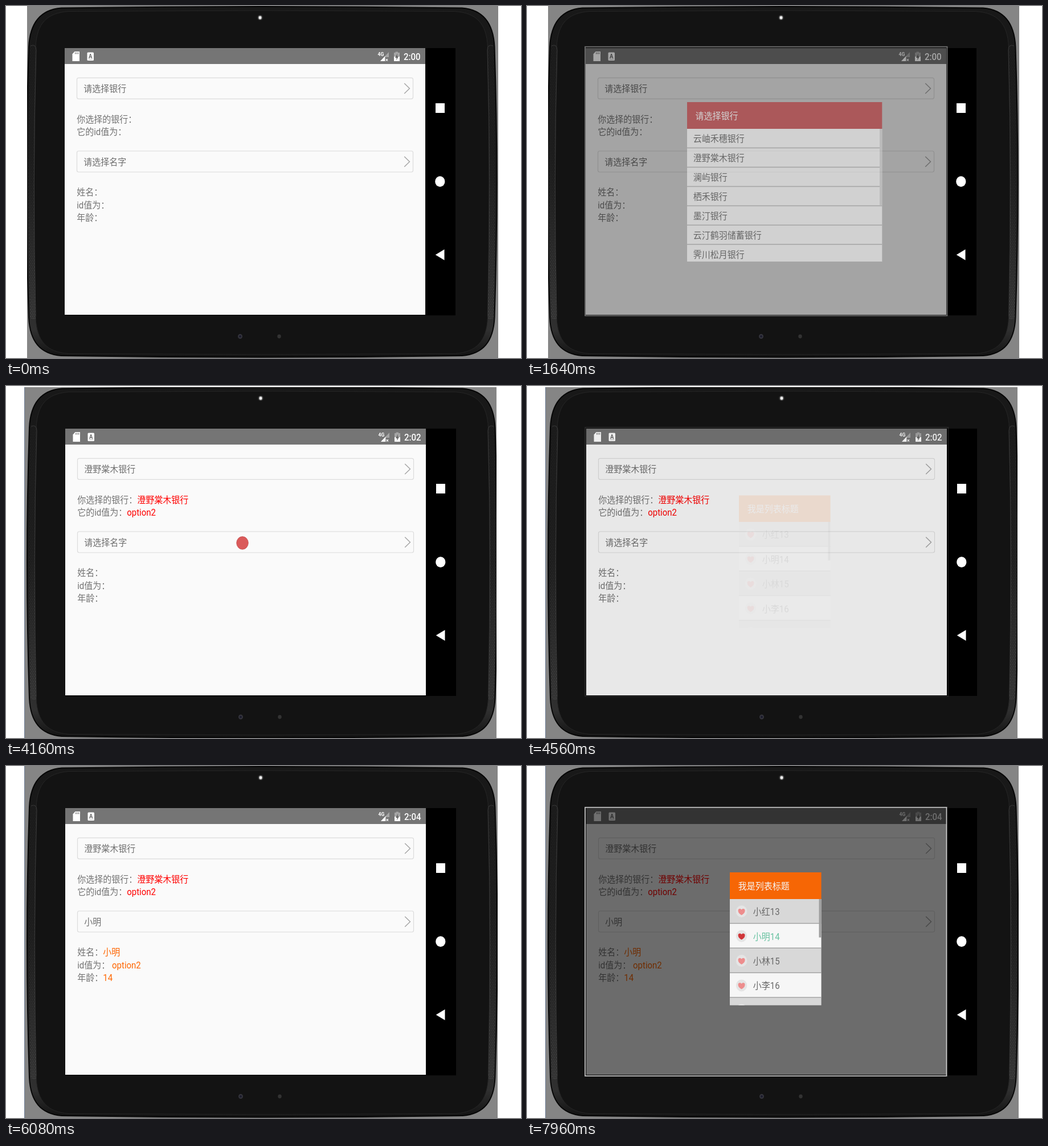
Write an HTML page with a canvas that moves like this. It is 904x619 px and loops after 8000 ms.

```html
<!DOCTYPE html>
<html lang="zh-CN">
<head>
<meta charset="utf-8">
<title>选择列表</title>
<style>
html, body { margin: 0; width: 100%; height: 100%; overflow: hidden; background: #fff; }
canvas { display: block; }
</style>
</head>
<body>
<canvas id="stage" width="904" height="619"></canvas>
<script>
const W = 904, H = 619, LOOP = 8000, STEP = 40;
const ASPECT = 1.09; // the tablet is shown slightly taller than it is
const FONT = 'Roboto, "Noto Sans CJK SC", "Noto Sans CJK", sans-serif';
const BANKS = ['云岫禾穗银行', '澄野棠木银行', '澜屿银行', '栖禾银行', '墨汀银行', '云汀鹤羽储蓄银行', '霁川松月银行'];
const PEOPLE = ['小红13', '小明14', '小林15', '小李16', '小王17'];
const RED = '#ff0000', ORANGE = '#ff6600', GREY = '#747474';

const SLIDES = [
  { crop: [37, 0, 864], dx: 0, dy: 0, time: '2:00', dim: 0.69, frame: [102, 71.7, 737.5, 544.5] },
  { crop: [32, 2, 861], dx: 1, dy: 1, time: '2:02', dim: 0.65, frame: [102, 72.8, 739.5, 545.5], bank: BANKS[1] },
  { crop: [32, 0, 863], dx: 1, dy: 0, time: '2:04', dim: 0.595, frame: [102, 72.8, 736.5, 545], bank: BANKS[1], person: '小明' }
];
const FADES = [[3200, 3600], [5680, 6080]];
const DIALOGS = [1280, 4480, 7280];
const DIALOG_TIME = 720;
const DOTS = [
  { start: 530, end: 1180, from: [350, 125], to: [293, 144.5] },
  { start: 2290, end: 3150, from: [514, 243], to: [445, 266.5] },
  { start: 3600, end: 4480, from: [517, 243], to: [415, 276] },
  { start: 5240, end: 5720, from: [520, 280], to: [450, 304] },
  { start: 6410, end: 7290, from: [575, 242], to: [473, 275.5] }
];

const clamp = v => Math.max(0, Math.min(1, v));

function layer(draw) {
  const c = document.createElement('canvas');
  c.width = W;
  c.height = H;
  draw(c.getContext('2d'));
  return c;
}

function box(g, x0, y0, x1, y1, color) {
  g.fillStyle = color;
  g.fillRect(x0, y0, x1 - x0, y1 - y0);
}

function poly(g, color, ...p) {
  g.fillStyle = color;
  g.beginPath();
  for (let i = 0; i < p.length; i += 2) g.lineTo(p[i], p[i + 1]);
  g.fill();
}

function oval(g, x, y, rx, ry, color) {
  g.fillStyle = color;
  g.beginPath();
  g.ellipse(x, y, rx, ry, 0, 0, 7);
  g.fill();
}

// y is the middle of the line
function text(g, str, x, y, color, size = 15, weight = 400) {
  g.save();
  g.translate(x, y + size * 0.38 * ASPECT);
  g.scale(1, ASPECT);
  g.font = `${weight} ${size}px ${FONT}`;
  g.fillStyle = color;
  g.fillText(str, 0, 0);
  g.restore();
}

function shell(g, inset, bulge) {
  const l = 40 + inset, r = 857.5 - inset, t = 3.5 + inset * 0.5, b = 615 - inset * 0.3;
  const k = 57;
  g.beginPath();
  g.moveTo(l, 72);
  g.bezierCurveTo(l + 2, 30, l + 20, t + 3, l + k, t);
  g.quadraticCurveTo(449, t - bulge, r - k, t);
  g.bezierCurveTo(r - 20, t + 3, r - 2, 30, r, 72);
  g.quadraticCurveTo(r + bulge * 1.6, 310, r, 548);
  g.bezierCurveTo(r - 2, 590, r - 20, b - 3, r - k, b);
  g.quadraticCurveTo(449, b + bulge, l + k, b);
  g.bezierCurveTo(l + 20, b - 3, l + 2, 590, l, 548);
  g.quadraticCurveTo(l - bulge * 1.6, 310, l, 72);
  g.closePath();
}

function grille(g, mirror) {
  const px = x => mirror ? 898 - x : x;
  for (let y = 72, row = 0; y < 550; y += 3, row++) {
    const bend = 3 * Math.sin((y - 70) / 480 * Math.PI);
    const shade = 42 + Math.round(50 * clamp((y - 250) / 300));
    for (let i = 0; i < 3; i++) {
      const x = 43.5 - bend + i * 3 + (row % 2) * 1.5;
      oval(g, px(x), y, 0.75, 0.8, `rgb(${shade},${shade},${shade})`);
    }
  }
  g.strokeStyle = '#3a3a3a';
  g.lineWidth = 1;
  g.beginPath();
  g.moveTo(px(43), 70);
  g.quadraticCurveTo(px(53), 66, px(53), 78);
  g.quadraticCurveTo(px(46), 310, px(52), 544);
  g.quadraticCurveTo(px(52), 553, px(44), 549);
  g.stroke();
}

function device(g) {
  const rim = g.createLinearGradient(0, 0, 0, H);
  rim.addColorStop(0, '#181818');
  rim.addColorStop(0.5, '#1c1c1c');
  rim.addColorStop(0.92, '#303030');
  rim.addColorStop(1, '#101010');
  shell(g, 0, 5);
  g.fillStyle = rim;
  g.fill();
  g.strokeStyle = '#060606';
  g.lineWidth = 2;
  g.stroke();
  shell(g, 12, 3);
  g.fillStyle = '#131313';
  g.fill();
  g.strokeStyle = '#262626';
  g.lineWidth = 1;
  g.stroke();
  grille(g, false);
  grille(g, true);
  oval(g, 446, 20.5, 5, 5, '#2b2b2b');
  oval(g, 446, 20.5, 3.2, 3.4, '#9a9a9a');
  oval(g, 446, 20.5, 2, 2.2, '#fff');
  oval(g, 411, 581, 4, 4.3, '#34343c');
  oval(g, 411, 581, 2, 2, '#1b1b2c');
  oval(g, 479.5, 581, 3.2, 3.4, '#333');
  box(g, 103, 74, 789, 544, '#000');
  box(g, 754, 171, 770, 188, '#fff');
  oval(g, 761.8, 308.7, 8.6, 9.4, '#fff');
  poly(g, '#fff', 753.8, 437.5, 769.5, 428, 769.5, 447);
}

function statusBar(g, time) {
  box(g, 103, 74, 736, 102, '#757575');
  poly(g, '#fff', 120.5, 80, 129, 80, 129, 97, 116.5, 97, 116.5, 84.5);
  for (let i = 0; i < 3; i++) box(g, 121 + i * 2.5, 81.5, 122.2 + i * 2.5, 84.5, '#757575');
  g.fillStyle = '#fff';
  g.beginPath();
  g.roundRect(142.5, 81.5, 11.5, 14.5, 1.5);
  g.fill();
  text(g, 'A', 145, 88.2, '#666', 9.5, 700);
  box(g, 145, 93.2, 152, 94, '#aaa');
  poly(g, '#a5a5a5', 657, 97, 672, 97, 672, 81);
  poly(g, '#fff', 657, 97, 665.5, 97, 665.5, 88);
  box(g, 665.5, 90, 672.5, 98, '#757575');
  text(g, '4G', 652.5, 84.2, '#fff', 8.5, 700);
  text(g, '×', 666, 94.3, '#fff', 9, 700);
  box(g, 683.5, 80.5, 688, 83, '#a5a5a5');
  box(g, 681, 82, 691, 90, '#a5a5a5');
  box(g, 681, 89, 691, 97, '#fff');
  poly(g, '#666', 687, 83.5, 683, 91, 685.6, 91, 685.2, 95.5, 689, 88.5, 686.6, 88.5);
  text(g, time, 698, 89.2, '#fff', 15, 500);
}

function field(g, y, label) {
  g.strokeStyle = '#dcdcdc';
  g.lineWidth = 1.2;
  g.beginPath();
  g.roundRect(124.5, y - 18.7, 590, 37, 3);
  g.stroke();
  g.strokeStyle = '#a6a6a6';
  g.lineWidth = 1.5;
  g.beginPath();
  g.moveTo(699.2, y - 9);
  g.lineTo(708.4, y);
  g.lineTo(699.2, y + 9);
  g.stroke();
  text(g, label, 136.3, y, '#707070');
}

function slide(g, s) {
  const [x0, y0, x1] = s.crop;
  g.fillStyle = '#fff';
  g.fillRect(0, 0, W, H);
  g.save();
  g.beginPath();
  g.rect(x0, y0, x1 - x0, H - y0);
  g.clip();
  box(g, x0, y0, x1, H, '#858585');
  if (x0 < 37) box(g, x0, y0, x0 + 1, H, '#70809a');
  g.translate(s.dx, s.dy);
  device(g);
  box(g, 103, 102, 736, 543, '#fafafa');
  statusBar(g, s.time);
  field(g, 145, s.bank || '请选择银行');
  text(g, '你选择的银行：', 124.2, 198.3, GREY);
  text(g, '它的id值为：', 124.2, 220.8, GREY);
  field(g, 273.7, s.person || '请选择名字');
  text(g, '姓名：', 124.2, 327, GREY);
  text(g, 'id值为：', 124.2, 349.5, GREY);
  text(g, '年龄：', 124.2, 371.7, GREY);
  if (s.bank) {
    text(g, s.bank, 229.2, 198.3, RED);
    text(g, 'option2', 211.2, 220.8, RED);
  }
  if (s.person) {
    text(g, s.person, 169.2, 327, ORANGE);
    text(g, 'option2', 185, 349.5, ORANGE);
    text(g, '14', 169.2, 371.7, ORANGE);
  }
  g.restore();
}

function bankDialog(g) {
  box(g, 281, 169, 623.3, 216, '#b30e12');
  text(g, '请选择银行', 295.5, 192.8, '#fff');
  box(g, 281, 216, 623.3, 450, '#fff');
  BANKS.forEach((name, i) => {
    const y = 232.8 + i * 33.95;
    text(g, name, 291.7, y, '#2c2c2c');
    if (i < 6) box(g, 281, y + 15.9, 623.3, y + 17.5, '#a8a8a8');
  });
  box(g, 619, 216, 623.3, 351, '#d2d2d2');
  box(g, 281, 449.5, 623.3, 450.5, '#999');
}

function heart(g, x, y, color) {
  oval(g, x, y, 9.7, 10.5, '#ececec');
  g.fillStyle = color;
  g.beginPath();
  g.moveTo(x, y + 6.5);
  g.bezierCurveTo(x - 4, y + 4, x - 6, y + 2, x - 6, y - 1.5);
  g.bezierCurveTo(x - 6, y - 5.5, x - 1.5, y - 5.5, x, y - 3);
  g.bezierCurveTo(x + 1.5, y - 5.5, x + 6, y - 5.5, x + 6, y - 1.5);
  g.bezierCurveTo(x + 6, y + 2, x + 4, y + 4, x, y + 6.5);
  g.fill();
}

function peopleDialog(g, x, y, picked) {
  g.beginPath();
  g.rect(x, y, 160.6, 233.8);
  g.clip();
  g.translate(x, y);
  box(g, 0, 0, 161, 47, ORANGE);
  text(g, '我是列表标题', 14.7, 24, '#fff');
  PEOPLE.forEach((name, i) => {
    const top = 47 + i * 43.4, on = i === picked;
    box(g, 0, top, 161, top + 43.4, i % 2 ? '#fff' : '#dfdfdf');
    box(g, 0, top + 42, 161, top + 43.6, '#a2a2a2');
    heart(g, 20.6, top + 21.7, on ? '#d63338' : '#f58f8f');
    text(g, name, 40.8, top + 22, on ? '#69c8a5' : '#696969');
  });
  box(g, 156.5, 47, 160.6, 114.5, '#a3a3a3');
}

const screens = SLIDES.map(s => layer(g => slide(g, s)));
const dialogs = [
  layer(bankDialog),
  layer(g => peopleDialog(g, 372, 192.2, -1)),
  layer(g => peopleDialog(g, 356, 187, 1))
];
const ctx = document.getElementById('stage').getContext('2d');

function paint(image, alpha) {
  ctx.globalAlpha = alpha;
  ctx.drawImage(image, 0, 0);
}

function dialog(i, p) {
  const s = SLIDES[i], [x0, y0, x1, y1] = s.frame;
  ctx.globalAlpha = p;
  box(ctx, x0, y0, x1, y1, `rgba(0,0,0,${s.dim})`);
  ctx.strokeStyle = '#cfcfcf';
  ctx.lineWidth = 1.8;
  ctx.strokeRect(x0, y0, x1 - x0, y1 - y0);
  paint(dialogs[i], p);
}

function dot(d, t) {
  const u = (t - d.start) / (d.end - d.start);
  if (u <= 0 || u >= 1) return;
  const w = clamp(u / 0.6);
  const x = d.from[0] + (d.to[0] - d.from[0]) * w;
  const y = d.from[1] + (d.to[1] - d.from[1]) * w;
  ctx.globalAlpha = Math.min(1, u / 0.44, (1 - u) / 0.4);
  oval(ctx, x, y, 10.3, 11.3, '#d64a4a');
  ctx.strokeStyle = '#c24a4a';
  ctx.lineWidth = 0.8;
  ctx.stroke();
}

function render(t) {
  const i = FADES.filter(f => t >= f[1]).length;
  paint(screens[i], 1);
  const p = clamp((t - DIALOGS[i]) / DIALOG_TIME);
  // a touch before the dialog lies beneath it
  DOTS.filter(d => d.start < DIALOGS[i]).forEach(d => dot(d, t));
  if (p > 0) dialog(i, p);
  DOTS.filter(d => d.start >= DIALOGS[i]).forEach(d => dot(d, t));
  if (i < 2) {
    const [start, end] = FADES[i];
    const mix = clamp((t - start) / (end - start));
    if (mix > 0) paint(screens[i + 1], mix);
  }
  ctx.globalAlpha = 1;
}

const origin = performance.now();
function tick() {
  const t = Math.max(0, performance.now() - origin) % LOOP;
  render(Math.floor(t / STEP) * STEP);
  requestAnimationFrame(tick);
}
tick();
</script>
</body>
</html>
```
